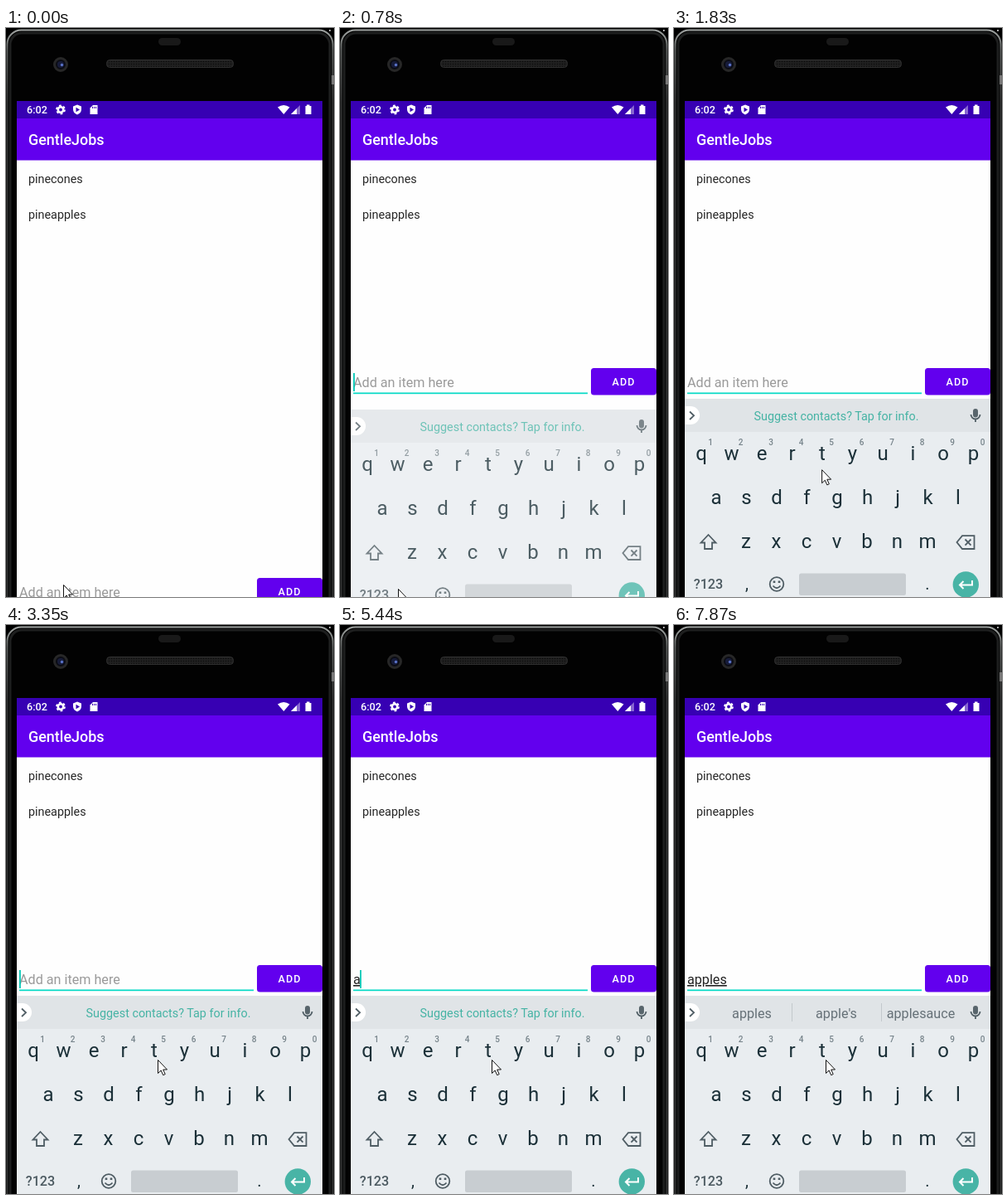
Recreate the animation shown at these times as an HTML page. Size 396 by 686 pixels, loop 8 s.

```html
<!DOCTYPE html>
<html lang="en">
<head>
<meta charset="utf-8">
<title>To-do list</title>
<style>
  html, body { margin: 0; height: 100%; overflow: hidden; background: #000; }
  svg { display: block; width: 396px; height: 686px; font-family: Roboto, sans-serif; }
  .mid { text-anchor: middle; }
  .medium { font-weight: 500; }
  .field { font-size: 16.16px; }
  .icon { fill: none; stroke: #4f5d64; stroke-width: 1.8; }
</style>
</head>
<body>
<svg viewBox="0 0 396 686">
  <defs>
    <linearGradient id="rim" gradientUnits="userSpaceOnUse" x1="0" y1="0" x2="0" y2="90">
      <stop offset="0" stop-color="#a4a8a6"/>
      <stop offset=".3" stop-color="#5c5f5e"/>
      <stop offset="1" stop-color="#343535"/>
    </linearGradient>
    <pattern id="mesh" width="3" height="3" patternUnits="userSpaceOnUse">
      <rect width="3" height="3" fill="#202020"/>
      <circle cx="1.5" cy="1.5" r=".8" fill="#0c0c0c"/>
    </pattern>
    <clipPath id="screen"><rect x="13" y="88" width="369" height="598"/></clipPath>
  </defs>

  <!-- phone -->
  <rect width="396" height="686"/>
  <rect x="1.5" y="2.5" width="393" height="760" rx="17" fill="#000" stroke="url(#rim)" stroke-width="2"/>
  <rect x="5" y="6" width="386" height="760" rx="14" fill="#020202" stroke="#1d1e1e" stroke-width="3"/>
  <circle cx="391" cy="3" r="1" fill="#ddd"/>
  <rect x="393" y="57" width="3" height="11" fill="#777"/>
  <rect x="184" y="12" width="27" height="9" rx="4.5" fill="#191919"/>
  <rect x="121.500" y="38.500" width="153" height="9" rx="4" fill="url(#mesh)" stroke="#303030"/>
  <circle cx="66" cy="44" r="7.500" fill="#0b0c14" stroke="#272727" stroke-width="3"/>
  <circle cx="66" cy="44" r="4" fill="#171c3a"/>
  <circle cx="67.500" cy="44.500" r="1.700" fill="#5a72c8"/>

  <!-- app -->
  <g clip-path="url(#screen)">
    <rect x="13" y="88" width="369" height="598" fill="#fefefe"/>
    <rect x="13" y="88" width="369" height="21" fill="#3700b3"/>
    <rect x="13" y="109" width="369" height="50.500" fill="#6200ee"/>
    <g fill="#fff">
      <text class="medium" x="25" y="103" font-size="12.6">6:02</text>
      <g fill="none" stroke="#fff">
        <circle cx="66" cy="98.500" r="3.200" stroke-width="2.600"/>
        <circle cx="66" cy="98.500" r="4.900" stroke-width="2" stroke-dasharray="2.700 2.431"/>
      </g>
      <path d="M86 92.500L91 94.500V98Q91 102.500 86 104.500Q81 102.500 81 98V94.500Z"/>
      <path d="M84.500 95.800L89 98.500L84.500 101.200Z" fill="#3700b3"/>
      <path d="M105 93H110.500V104H101.500V96.500Z"/>
      <path d="M104.500 94.800V97M106.600 94.800V97M108.600 94.800V97" stroke="#3700b3"/>
      <path d="M328 95.500Q335.300 90.500 342.500 95.500L335.300 104Z"/>
      <path d="M344 104L355 93V104Z" opacity=".4"/>
      <path d="M344 104L351 97V104Z"/>
      <path d="M363 92.500H366.500V94H368.500V104H361.500V94H363Z"/>
      <text class="medium" x="27" y="141" font-size="17.96">GentleJobs</text>
    </g>
    <g font-size="14.37" fill="#262626">
      <text x="27" y="186.500">pinecones</text>
      <text x="27" y="229.500">pineapples</text>
    </g>

    <g id="entry">
      <text id="hint" class="field" x="16" y="433" fill="#9a9a9a">Add an item here</text>
      <text id="typed" class="field" x="16" y="433" fill="#222" text-decoration="underline"></text>
      <rect x="16" y="439.500" width="283" height="1.700" fill="#03dac5"/>
      <rect id="caret" x="16" y="416" width="1.800" height="22" fill="#03c8b6"/>
      <rect x="303" y="410" width="79" height="32.500" rx="3.500" fill="#6200ee"/>
      <text class="mid medium" x="342.600" y="431" font-size="12.57" letter-spacing="1.12" fill="#fff">ADD</text>
    </g>

    <g id="keyboard">
      <rect x="13" y="447" width="369" height="260" fill="#e9edf0"/>
      <rect x="13" y="447" width="369" height="40" fill="#e0e4e7"/>
      <path d="M13 456H20A11 11 0 0 1 20 478H13Z" fill="#fff"/>
      <path class="icon" d="M19 462.500L24 467.300L19 472" stroke-width="2"/>
      <text id="tip" class="mid" x="196" y="472.500" font-size="14.37" fill="#45b3a4">Suggest contacts? Tap for info.</text>
      <g id="words" class="mid field" fill="#657077">
        <path d="M142.500 456V478M250.500 456V478" stroke="#c3c8cc"/>
        <text x="94" y="473.500"></text>
        <text x="196" y="473.500"></text>
        <text x="298" y="473.500"></text>
      </g>
      <rect x="361" y="459" width="6" height="10.500" rx="3" fill="#58656c"/>
      <path class="icon" d="M358.500 466A5.500 5.500 0 0 0 369.500 466M364 471.500V475" stroke-width="1.600"/>
      <g id="keys" class="mid"></g>
      <path class="icon" d="M41.500 611L50.500 620.500H46V628H37V620.500H32.500Z"/>
      <path class="icon" d="M341.500 620L348 612.200H362.500V628H348ZM351.500 616.500L358.500 623.700M358.500 616.500L351.500 623.700"/>
      <text class="mid medium" x="41.500" y="676" font-size="16.16" fill="#4c5a61">?123</text>
      <circle class="icon" cx="124" cy="670.500" r="8.300"/>
      <path class="icon" d="M119.500 672.500Q124 678 128.500 672.500"/>
      <path d="M119.700 666.500H122.300V669H119.700ZM125.700 666.500H128.300V669H125.700Z" fill="#4f5d64"/>
      <rect x="151" y="657.500" width="129" height="26.500" rx="2.500" fill="#c8cdd1"/>
      <circle cx="352.300" cy="671" r="15.700" fill="#48b4a6"/>
      <path d="M360 666V671.500H345.500M349.500 667L345 671.500L349.500 676" fill="none" stroke="#fff" stroke-width="2"/>
    </g>
  </g>

  <path id="mouse" d="M.5 .5V16.500L4.200 13L6.700 18.700L9.200 17.600L6.700 12H11.500Z" fill="#fff" stroke="#111"/>
</svg>
<script>
const $ = id => document.getElementById(id);
const [entry, hint, typed, caret, keyboard, tip, words, keys, mouse] =
  ['entry', 'hint', 'typed', 'caret', 'keyboard', 'tip', 'words', 'keys', 'mouse'].map($);
const slots = words.querySelectorAll('text');
const PITCH = 36.5;

function addKey(label, x, y, size = 24, fill = '#1b3038', weight = 400) {
  const key = document.createElementNS('http://www.w3.org/2000/svg', 'text');
  const attrs = { x, y, fill, 'font-size': size, 'font-weight': weight };
  for (const name in attrs) key.setAttribute(name, attrs[name]);
  key.textContent = label;
  keys.append(key);
}
[['qwertyuiop', 33], ['asdfghjkl', 51], ['zxcvbnm', 87]].forEach(([row, x], r) =>
  [...row].forEach((c, i) => addKey(c, x + i * PITCH, 520.5 + r * 53)));
[...'1234567890'].forEach((c, i) => addKey(c, 44 + i * PITCH, 503, 10, '#76838a', 500));
addKey(',', 88, 677, 20);
addKey('.', 306, 677, 20);

// Each list holds [start time, ...values]; the latest started entry applies.
const typing = [[0, ''], [5440, 'a'], [6010, 'ap'], [6130, 'app'], [6630, 'appl'], [6760, 'apple'], [7470, 'apples']];
const offers = [[0], [6630, 'appl', 'application', 'APPL'], [6760, 'apple', 'apply', 'apples'], [7470, 'apples', "apple's", 'applesauce']];
const rise = [[0, 253, 0], [650, 36, .4], [780, 13, .78], [900, 3, .95], [1050, 0, 1]];
const pointer = [[0, 69, 671], [650, 69, 674], [780, 70, 676], [900, 82, 675], [1050, 95, 672]];
const blinks = [510, 900, 1200, 1700, 2230, 2770, 3350, 3780, 4310, 4740, 5290, 7190, 7470, 7870];
const at = (list, t) => list.findLast(e => e[0] <= t).slice(1);

function pointerAt(t) {
  const [x, y] = at(pointer, t);
  if (t < 1200) return [x, y];
  const p = Math.min(1, (Math.floor((t - 1200) / 125) + 1) / 7);
  const k = p * p * (3 - 2 * p);
  return [x + 88 * k, y - 148 * k];
}

function draw() {
  const t = performance.now() % 8000;
  const move = (el, x, y) => el.setAttribute('transform', `translate(${x} ${y})`);

  move(entry, 0, t < 650 ? 253 : 0);
  const [drop, alpha] = at(rise, t);
  move(keyboard, 0, drop);
  keyboard.setAttribute('opacity', alpha);
  move(mouse, ...pointerAt(t));

  const [text] = at(typing, t);
  typed.textContent = text;
  hint.style.display = text ? 'none' : '';
  caret.setAttribute('x', text ? 15.2 + typed.getComputedTextLength() : 16);
  caret.style.display = blinks.filter(b => b <= t).length % 2 ? '' : 'none';

  const offer = at(offers, t);
  tip.style.display = offer.length ? 'none' : '';
  words.style.display = offer.length ? '' : 'none';
  slots.forEach((slot, i) => slot.textContent = offer[i] || '');
  const bold = offer[1] === 'application';
  slots[1].style.fontWeight = bold ? 700 : 400;
  slots[1].style.fill = bold ? '#0c0c0c' : '';

  requestAnimationFrame(draw);
}
draw();
</script>
</body>
</html>
```
